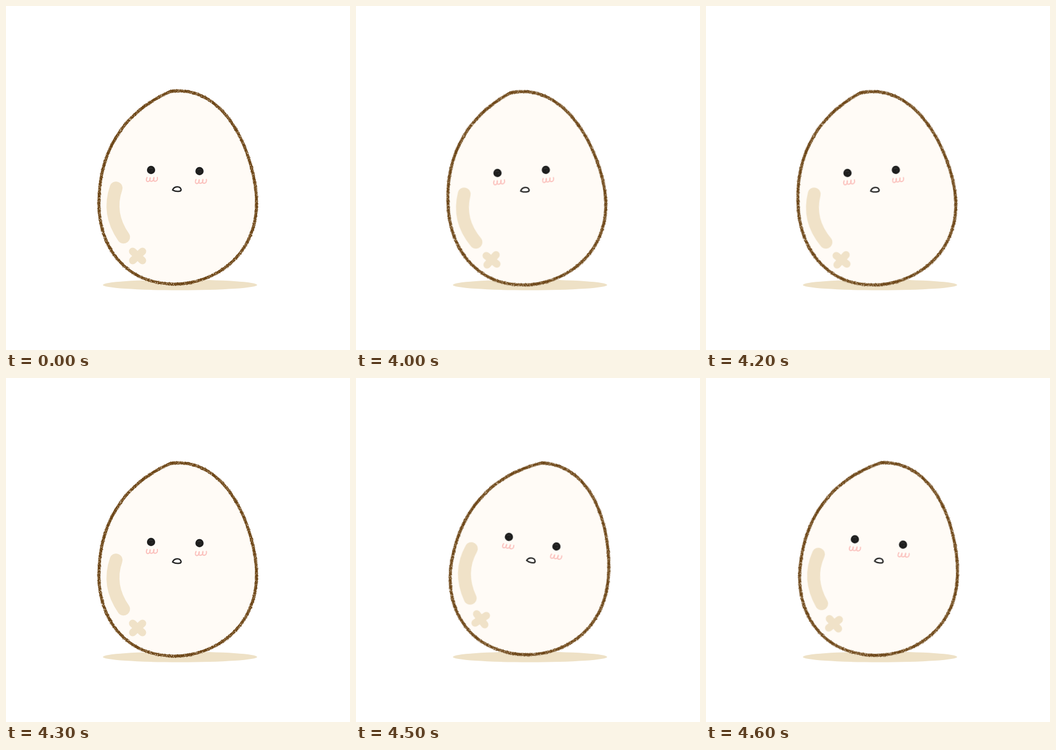
An HTML page that plays this animation: 600x600 px, repeating every 4700 ms.

```html
<!DOCTYPE html>
<html lang="en">
<head>
<meta charset="utf-8">
<title>Wobbling egg</title>
<style>
  html, body { margin: 0; width: 100%; height: 100%; overflow: hidden; background: #fff; }
  svg { display: block; width: 100vw; height: 100vh; }
  path { fill: none; stroke-linecap: round; stroke-linejoin: round; }
  .egg { transform-origin: 310px 360px; animation: wobble 4.7s infinite; }
  .shine { stroke: #f0e2c8; }
  .ink { stroke: #1e1e1e; }
  .blush { stroke: #fbbfbb; stroke-width: 1.9; }
  /* rest for 4 s, then tilt by 5 degrees every 100 ms */
  @keyframes wobble {
    0%     { transform: rotate(0deg); animation-timing-function: step-end; }
    85.1%  { transform: rotate(0deg); animation-timing-function: steps(2, jump-start); }
    89.36% { transform: rotate(-10deg); animation-timing-function: steps(4, jump-start); }
    97.87% { transform: rotate(10deg); animation-timing-function: steps(1, jump-both); }
    100%   { transform: rotate(0deg); }
  }
</style>
</head>
<body>
<svg viewBox="0 0 600 600">
  <ellipse cx="303.5" cy="486.5" rx="134.5" ry="9.3" fill="#eee1c6"/>
  <g class="egg">
    <path id="shell" style="fill:#fffbf6" stroke="#6f4819" stroke-width="4.8"
      d="M288 148.5C197 188 162 263 162 345C162 418 206 484 293 485C360 486 437 438 437 343C437 283 399 151 303 148Z"/>
    <g id="crayon"></g>

    <path class="shine" stroke-width="22.5" d="M192 317.5Q176.5 362 205 403"/>
    <path class="shine" stroke-width="13" d="M221 428l17 16m0-16l-17 16"/>

    <g id="eye">
      <circle cx="253" cy="286" r="7.2" fill="#1e1e1e"/>
      <path d="M250 283.5q3-2 5 0m-1 4.5l1.5-1" stroke="#4a4a4a" stroke-width=".8"/>
    </g>
    <use href="#eye" x="84.5" y="2"/>

    <path id="cheek" class="blush" d="M246 299c-5 10 7 9 5.500 .5c-4 9 8 8 6.500-.5c-4 9 8 9 6 0"/>
    <use href="#cheek" x="85.5" y="3.5"/>

    <path class="ink" style="fill:#fffdfa" stroke-width="2.2" d="M290.500 321C293 314 304 313 305.500 320.500C305 324.500 296 324 290.500 321Z"/>
  </g>
</svg>
<script>
  const shell = document.getElementById('shell');
  const crayon = document.getElementById('crayon');
  const length = shell.getTotalLength();

  let seed = 41;
  function random() {
    seed = (seed * 16807) % 2147483647;
    return seed / 2147483647;
  }

  // Scatters dots along the shell, up to `spread` to either side of its line
  function grains(count, spread, width, color) {
    let d = '';
    for (let i = 0; i < count; i++) {
      const s = random() * (length - 1);
      const p = shell.getPointAtLength(s);
      const q = shell.getPointAtLength(s + 1);
      const off = spread * (2 * random() - 1);
      const x = p.x + (q.y - p.y) * off;
      const y = p.y - (q.x - p.x) * off;
      d += `M${x.toFixed(1)} ${y.toFixed(1)}h.1`;
    }
    const path = document.createElementNS('http://www.w3.org/2000/svg', 'path');
    path.setAttribute('d', d);
    path.setAttribute('stroke', color);
    path.setAttribute('stroke-width', width);
    crayon.append(path);
  }

  grains(900, 3.3, 1.1, '#b39a7b');
  grains(1100, 2.7, 1.5, '#6a4417');
  grains(420, 3, 0.9, '#cdb797');
  grains(90, 3, 1.3, '#fbf4ea');
</script>
</body>
</html>
```
